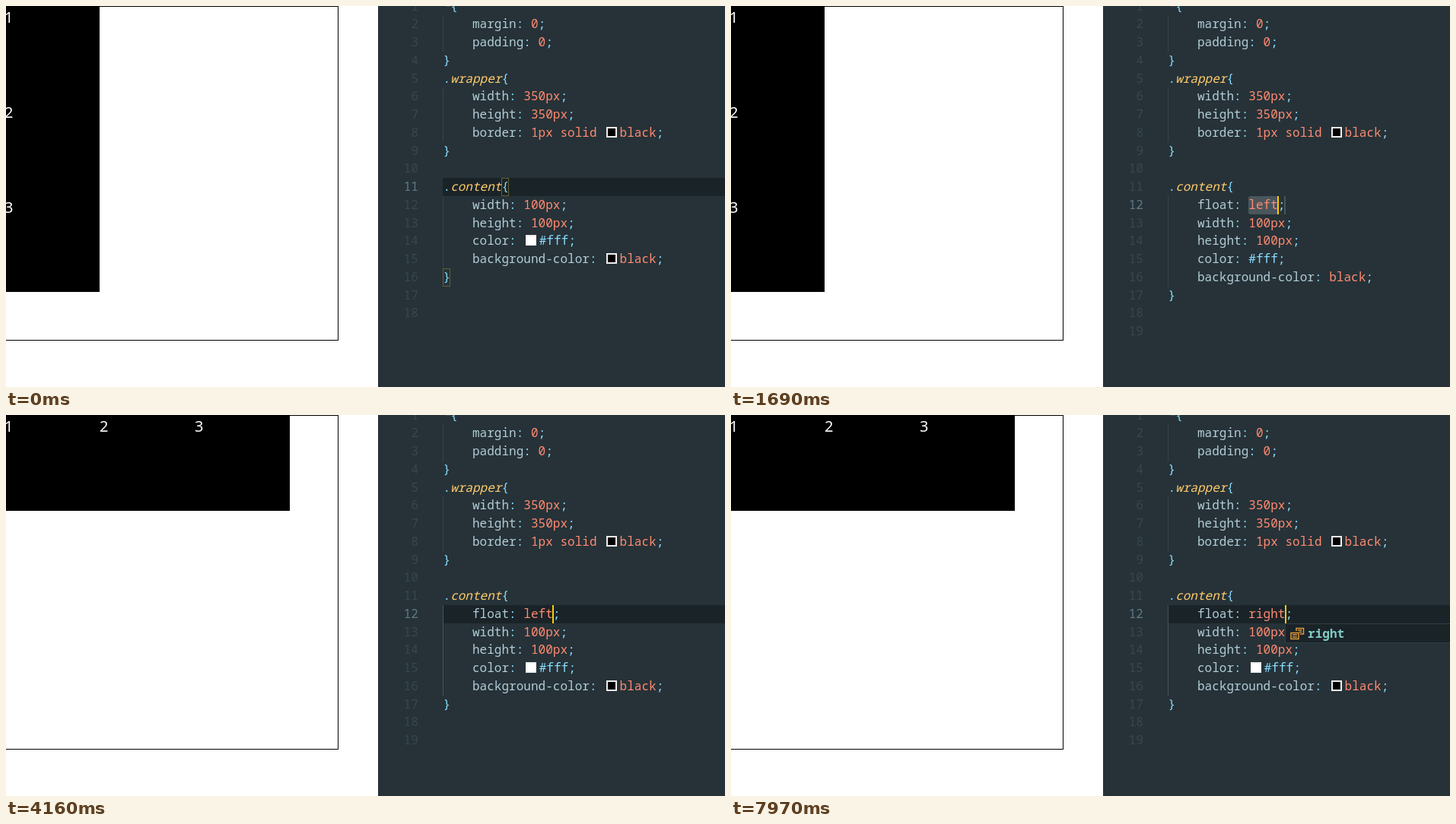
Write an HTML page that moves like this. It is 945 px wide and 501 px high and loops after 8 s.

```html
<!DOCTYPE html>
<html lang="en">
<head>
<meta charset="utf-8">
<title>Float demo</title>
<style>
html, body { margin: 0; width: 100%; height: 100%; overflow: hidden; background: #fff; }
#stage { position: relative; width: 945px; height: 501px; overflow: hidden; }
#wrap { position: absolute; left: -3px; top: 0; width: 438px; height: 438px; border: 1px solid #000; }
#wrap div { width: 125px; height: 125px; background: #000; color: #fff; font: 20px/27px "Noto Sans", sans-serif; }
#wrap.row div { float: left; }
#editor { position: absolute; left: 489px; top: 0; width: 456px; height: 501px; overflow: hidden; background: #263238; }
#code { position: absolute; left: -489px; top: 0; width: 945px; height: 501px;
  font: 16px/24px "Noto Sans Mono", monospace; letter-spacing: .02px; color: #eff; white-space: pre; }
#code > * { position: absolute; }
.num { left: 489px; width: 53px; text-align: right; color: #37474f; }
.num.on { color: #607a86; }
.line { left: 574.5px; }
.active { left: 574px; width: 371px; height: 24px; background: #1a2328; }
.guide { left: 574px; width: 1px; background: #35444c; }
.guide.on { background: #43535b; }
.match { width: 8px; height: 22px; border: 1px solid #62602f; }
.sel { left: 680px; width: 39px; height: 24px; border-radius: 3px; background: #4a565b; }
.stop { left: 727px; width: 2px; height: 24px; background: #4a565b; }
.squiggle { left: 690px; height: 4px; line-height: 0; }
.caret { width: 2px; height: 24px; background: #fc0; }
.p { color: #b2ccd6; }
.v { color: #ff8a70; }
.s { color: #89ddff; }
.c { color: #ffcb6b; font-style: italic; }
.box { display: inline-block; box-sizing: border-box; width: 14px; height: 14px; margin: 0 3.4px 0 3px;
  border: 2px solid #eee; vertical-align: -1px; }
.popup { top: 274px; width: 400px; border: 1px solid #303e45; box-sizing: border-box; background: #263238; font-weight: 500; }
.popup div { position: relative; height: 23.8px; padding-left: 29px; }
.popup div:first-child { background: #1a2328; }
.popup svg { position: absolute; left: 6px; top: 3px; fill: none; }
.popup b { color: #80cbc4; }
</style>
</head>
<body>
<div id="stage">
  <div id="wrap"><div>1</div><div>2</div><div>3</div></div>
  <div id="editor"><div id="code"></div></div>
</div>
<script>
(() => {
const LOOP = 8000, X0 = 574.5, CHAR = 9.62;
const wrap = document.getElementById('wrap'), code = document.getElementById('code');

const HEAD = ['*{', '    margin: 0;', '    padding: 0;', '}', '.wrapper{', '    width: 350px;',
  '    height: 350px;', '    border: 1px solid black;', '}', '', '.content{'];
const TAIL = ['    width: 100px;', '    height: 100px;', '    color: #fff;',
  '    background-color: black;', '}', '', ''];

const WORDS_F = ['font: 1em sans-serif;', 'fallback', 'fill', 'fill-opacity', 'fill-rule', 'filter', 'flex',
  'flex-basis', 'flex-direction', 'flex-flow', 'flex-grow', 'flex-shrink'];
const WORDS_FL = ['float: left;', 'flex', 'flex-basis', 'flex-direction', 'flex-flow', 'flex-grow',
  'flex-shrink', 'flex-wrap', 'float', 'flood-color', 'flood-opacity', 'fill'];
const WORDS_FLO = ['float: left;', 'float', 'flood-color', 'flood-opacity', 'flex-flow', 'fill-opacity',
  'overflow', 'overflow-x', 'overflow-y'];

// Each step changes only the listed properties.
const STEPS = [
  [0, { row: 11, text: null, caret: false, swatch: true, floated: false, sel: false, stop: false, list: null, known: false, error: false }],
  [450, { row: 12, text: '', caret: true }],
  [560, { swatch: false }],
  [700, { text: 'f' }],
  [850, { list: WORDS_F, hit: 'f' }],
  [920, { text: 'fl' }],
  [990, { list: WORDS_FL, hit: 'fl' }],
  [1300, { text: 'flo' }],
  [1460, { list: WORDS_FLO, hit: 'flo' }],
  [1690, { text: 'float: left;', known: true, sel: true, stop: true, list: null }],
  [2170, { caret: false }],
  [2640, { caret: true, swatch: true }],
  [2780, { floated: true }],
  [3250, { row: 14, sel: false }],
  [3400, { stop: false }],
  [3690, { caret: false }],
  [4160, { row: 12, caret: true }],
  [4390, { caret: false }],
  [4700, { caret: true }],
  [4910, { text: 'float: lef;', known: false }],
  [5110, { text: 'float: le;' }],
  [5320, { text: 'float: l;' }],
  [5590, { text: 'float: ;' }],
  [6030, { caret: false }],
  [6200, { text: 'float: r;', caret: true, error: true }],
  [6350, { list: ['right'], hit: '' }],
  [6580, { text: 'float: ri;', hit: 'ri', error: false }],
  [7040, { caret: false }],
  [7440, { text: 'float: rig;', hit: 'rig', caret: true }],
  [7530, { text: 'float: righ;', hit: 'righ' }],
  [7910, { text: 'float: right;', hit: 'right' }],
  [7970, { known: true }]
];
let last = {};
const STATES = STEPS.map(([, change]) => last = { ...last, ...change });

const rowY = n => Math.round(226 + (n - 11) * 23.75);
const span = (cls, text) => `<span class="${cls}">${text}</span>`;
const block = (cls, y, style = '', inner = '') => `<div class="${cls}" style="top:${y}px;${style}">${inner}</div>`;

function paint(text, swatch, known) {
  const rule = text.match(/^(\.?)([\w*]*)\{$/);
  if (rule) return span('s', rule[1]) + span('c', rule[2]) + span('s', '{');
  const decl = text.match(/^( +[\w-]+)(: )(.*)(;)$/);
  if (!decl) return text === '}' ? span('s', text) : text;
  const [, prop, colon, value, end] = decl;
  const painted = value.split(/(black|#fff)/).filter(Boolean).map(part => {
    const isColor = part === 'black' || part === '#fff';
    const chip = isColor && swatch ? `<i class="box" style="background:${part}"></i>` : '';
    return chip + (part === '#fff' ? span('s', part) : known ? span('v', part) : part);
  }).join('');
  return span('p', prop) + span('s', colon) + painted + span('s', end);
}

function mark(word, hit) {
  let i = 0;
  return [...word].map(ch => ch === hit[i] ? (i++, `<b>${ch}</b>`) : ch).join('');
}

const WRENCH = '<svg width="19" height="19" stroke="#c5c5c5"><path d="M3 16 10.5 8.5" stroke-width="4" stroke-linecap="round"/>' +
  '<path d="M13.2 2.2A3.75 3.75 0 1 0 16 5.2" stroke-width="3"/></svg>';
const ENUM = '<svg width="19" height="19" stroke="#e0993a" stroke-width="1.5"><path d="M8 6V2.5H17.5V10H13M10 5H15M12 7.5H15"/>' +
  '<path d="M1 8.5H11V16.5H1ZM3 11H9M3 14H9"/></svg>';
const SQUIGGLE = '<svg width="9" height="4" fill="none" stroke="#c0504d"><path d="M0 3.5 2.5 1 5 3.5 7.5 1"/></svg>';

function render(s) {
  const typed = s.text !== null;
  const lines = [...HEAD, ...(typed ? ['    ' + s.text] : []), ...TAIL];
  const endRow = typed ? 17 : 16;
  const col = s.row === 14 ? 18 : 4 + (s.text || '').replace(';', '').length;
  const x = Math.floor(X0 + col * CHAR);
  let html = s.sel ? '' : block('active', rowY(s.row));

  for (const [from, to] of [[2, 4], [6, 9], [12, endRow]]) {
    const on = from === 12 && typed && !s.sel ? ' on' : '';
    html += block('guide' + on, rowY(from), `height:${rowY(to) - rowY(from)}px`);
  }
  if (s.row === 11) html += block('match', rowY(11), 'left:651px') + block('match', rowY(16), 'left:574px');
  if (s.sel) html += block('sel', rowY(12));
  if (s.stop) html += block('stop', rowY(12));

  lines.forEach((text, i) => {
    const n = i + 1, edited = typed && n === 12;
    html += block(n === s.row ? 'num on' : 'num', rowY(n) - 1, '', n);
    html += block('line', rowY(n) - 1, '', paint(text, n < 11 || s.swatch, !edited || s.known));
  });

  if (s.error) html += block('squiggle', 270, '', SQUIGGLE);
  if (s.list) {
    const icon = s.list.length > 1 ? WRENCH : ENUM;
    html += block('popup', 274, `left:${x}px`, s.list.map(w => `<div>${icon}${mark(w, s.hit)}</div>`).join(''));
  }
  if (s.caret) html += block('caret', rowY(s.row), `left:${x}px`);
  code.innerHTML = html;
  wrap.className = s.floated ? 'row' : '';
}

let shown = -1;
function tick() {
  const t = performance.now() % LOOP;
  const i = STEPS.filter(([at]) => at <= t).length - 1;
  if (i !== shown) render(STATES[shown = i]);
  requestAnimationFrame(tick);
}
tick();
})();
</script>
</body>
</html>
```
